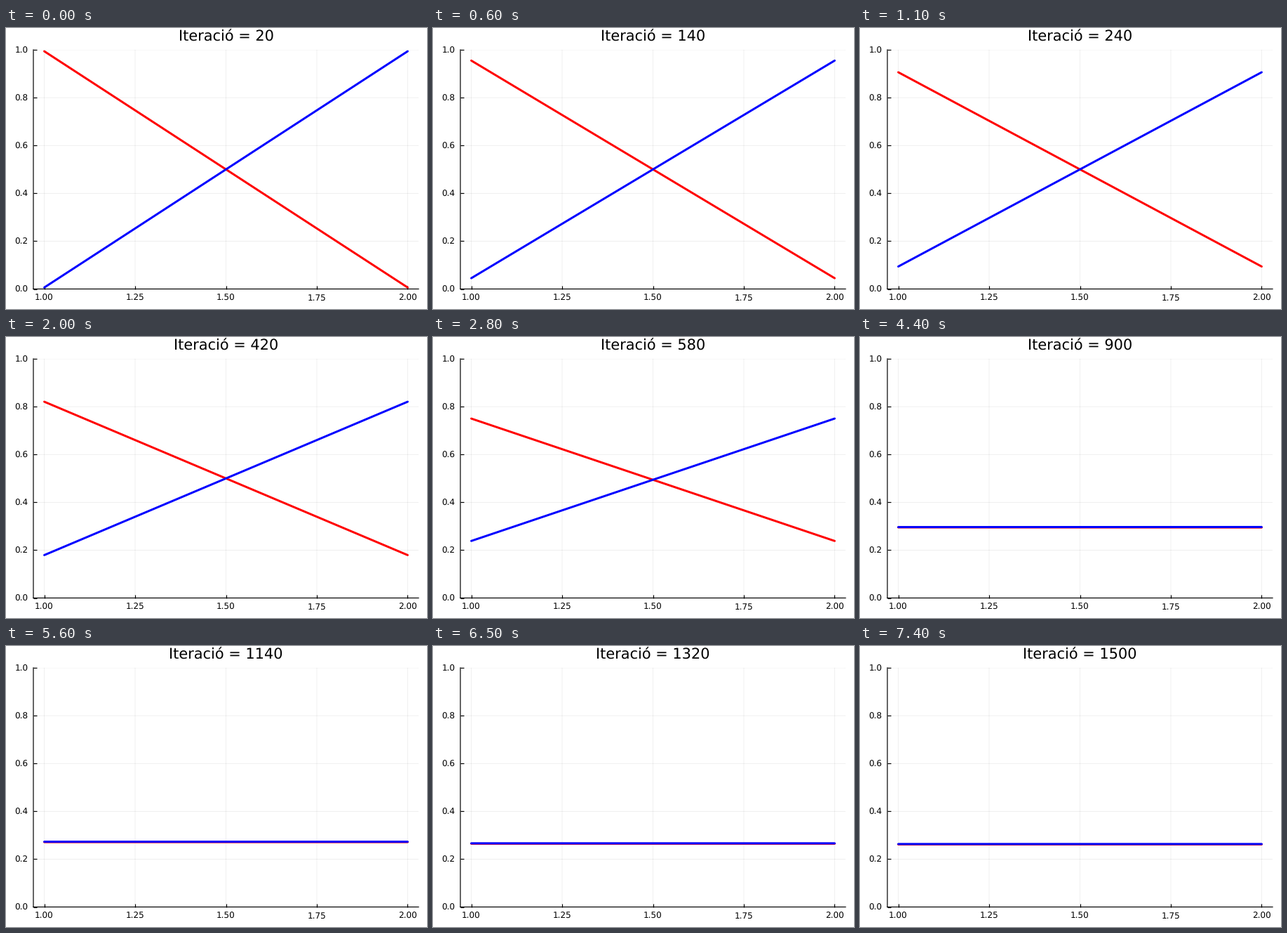
These frames come from a looping animation (600 px wide and 400 px high, 7.5 s). A matplotlib script:

```python
import numpy as np
import matplotlib.pyplot as plt
from matplotlib.animation import FuncAnimation

W, H, DPI = 600, 400, 100
PX = 72 / DPI
FRAMES, STEP = 75, 20
LEFT, RIGHT, TOP, BOTTOM = 39, 588, 31, 371.5

plt.rcParams.update({
    "font.family": "DejaVu Sans",
    "text.hinting": "none",
    "path.snap": False,
})

fig = plt.figure(figsize=(W / DPI, H / DPI), dpi=DPI, facecolor="white")
ax = fig.add_axes([LEFT / W, 1 - BOTTOM / H, (RIGHT - LEFT) / W, (BOTTOM - TOP) / H])
ax.set_xlim(.97, 2.03)
ax.set_ylim(0, 1)
xticks = np.linspace(1, 2, 5)
yticks = np.linspace(0, 1, 6)
ax.set_xticks(xticks)
ax.set_yticks(yticks)
ax.set_axisbelow(True)
ax.grid(color="black", alpha=.1, lw=.6 * PX)
ax.tick_params(direction="in", length=5 * PX, width=1.2 * PX,
               labelbottom=False, labelleft=False)
ax.spines[["top", "right"]].set_visible(False)
ax.spines[["left", "bottom"]].set_linewidth(1.2 * PX)


def label(x, y, text, size, ha="center"):
    return fig.text(x / W, 1 - y / H, text, fontsize=size * PX, ha=ha, va="baseline")


for v in xticks:
    label(LEFT + (v - .97) / 1.06 * (RIGHT - LEFT), 387.5, f"{v:.2f}", 12)
for v in yticks:
    label(31.5, BOTTOM - v * (BOTTOM - TOP) + 4.4, f"{v:.1f}", 12, "right")

title = label((LEFT + RIGHT) / 2, 18.6, "", 20.9)
red, blue = (ax.plot([1, 2], [0, 0], color=c, lw=3 * PX, solid_capstyle="round")[0]
             for c in ("#ff0000", "#0000ff"))


def fade(n, scale, power):
    """Stays near 1, then drops to 0 around n = scale."""
    return np.exp(-(n / scale) ** power)


def state(n):
    """Mean level, gap between the ends, and late offset of the two lines."""
    settled = .26 + .035 * np.exp(-max(n - 900, 0) / 225)
    hold = fade(n, 780, 12)
    mean = settled + (.5 - settled) * hold
    lag = 110 * (1 - np.exp(-n / 110))
    gap = .99 * np.exp(-.00139 * (n - lag)) * fade(n, 800, 16)
    return mean, gap, .0008 * (1 - hold)


def update(k):
    n = STEP * (k + 1)
    mean, gap, shift = state(n)
    ends = np.array([.5, -.5]) * gap
    red.set_ydata(mean - shift + ends)
    blue.set_ydata(mean + shift - ends)
    title.set_text(f"Iteració = {n}")
    return red, blue, title


anim = FuncAnimation(fig, update, frames=FRAMES, interval=100, repeat=True,
                     repeat_delay=0, blit=False)
plt.show()
```
